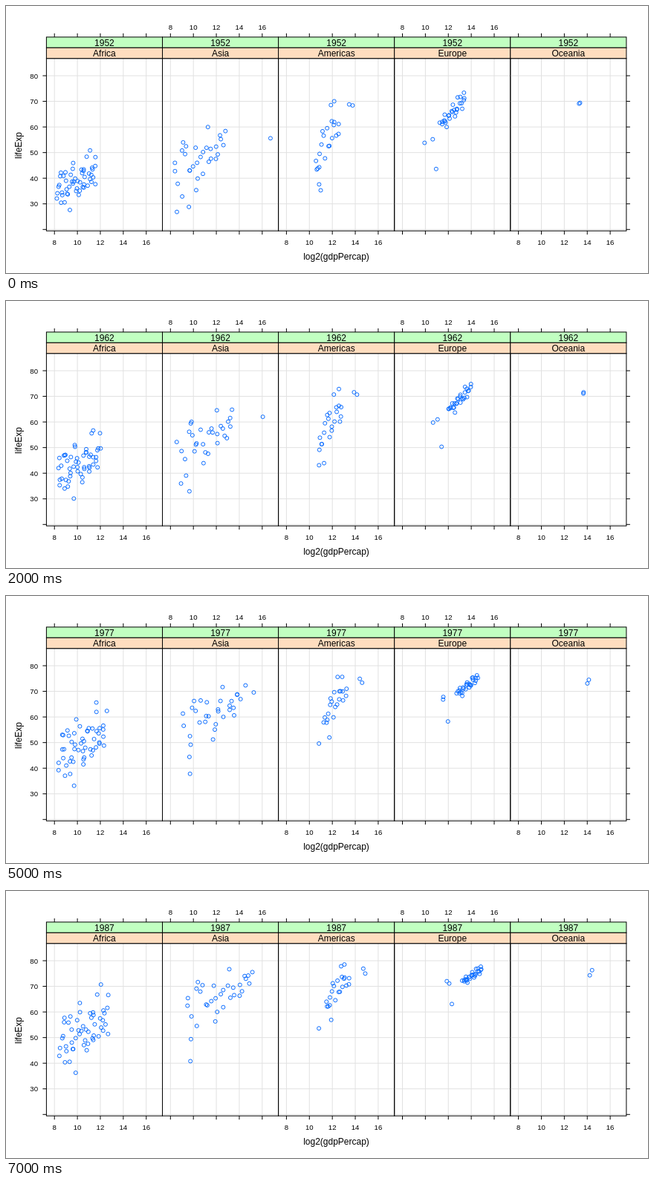
Recreate the animation shown at these times as an HTML page. Size 864 px wide and 360 px high, loop 8 s.

```html
<!DOCTYPE html>
<html lang="en">
<head>
<meta charset="utf-8">
<title>Life expectancy by income</title>
<style>
html, body { margin: 0; width: 100%; height: 100%; overflow: hidden; background: #fff; }
svg { display: block; width: 864px; height: 360px; }
text { font: 12px "Liberation Sans", Arial, sans-serif; text-anchor: middle; }
.small { font-size: 9.6px; }
.end { text-anchor: end; }
.line { stroke: #000; fill: none; }
.grid { stroke: #e1e1e1; fill: none; }
.dot { stroke: #0a6cff; fill: none; }
</style>
</head>
<body>
<svg id="chart" viewBox="0 0 864 360"></svg>
<script>
// Each cloud drifts from its first to its last [mean x, spread x, mean y, spread y];
// tilt is the correlation. Loners lie outside it and go from one [x, y] to another.
const panels = [
  { name: 'Africa', count: 52, tilt: .5,
    cloud: [[9.92, 1, 39.1, 5.1], [10.6, 1.25, 53.3, 7.5]], loners: [] },
  { name: 'Asia', count: 31, tilt: .72,
    cloud: [[10.5, 1.3, 46.6, 8.5], [12.2, 1.65, 65.7, 7]],
    loners: [[[16.72, 55.6], [14.78, 74.2]], [[9.61, 28.8], [9.74, 40.8]]] },
  { name: 'Americas', count: 22, tilt: .6,
    cloud: [[11.55, .6, 53, 8], [12.45, .6, 68, 5]],
    loners: [[[13.77, 68.4], [14.87, 75]], [[13.47, 68.8], [14.7, 76.9]],
      [[10.85, 37.6], [10.83, 53.6]]] },
  { name: 'Europe', count: 27, tilt: .9,
    cloud: [[12.4, .65, 65.8, 4.5], [14.1, .5, 74.2, 2.1]],
    loners: [[[10.94, 43.6], [12.31, 63.1]], [[9.93, 53.8], [12.08, 71.1]],
      [[10.64, 55.2], [11.87, 72]]] },
  { name: 'Oceania', count: 0, tilt: 0, cloud: [[], []],
    loners: [[[13.29, 69.1], [14.42, 76.3]], [[13.37, 69.4], [14.22, 74.3]]] }
];

const WIDTH = 156.1, LEFT = 54.4, TOP = 41.9, STRIP = 14.4, BOTTOM = 303.2;
const MID = TOP + STRIP, HEAD = MID + STRIP;
const STEPS = 8, STEP_MS = 1000, FIRST_YEAR = 1952;
const chart = document.getElementById('chart');
const xTicks = [8, 10, 12, 14, 16];
const yTicks = [20, 30, 40, 50, 60, 70, 80];
const px = v => 65.2 + (v - 8) * 15.44;
const py = v => 94 + (80 - v) * 3.455;
const mix = (from, to, p) => from.map((v, i) => v + (to[i] - v) * p);

let seed = 1952;
function random() {
  seed = (seed * 1664525 + 1013904223) % 4294967296;
  return seed / 4294967296;
}

function add(tag, attrs, text) {
  const el = document.createElementNS('http://www.w3.org/2000/svg', tag);
  for (const key in attrs) el.setAttribute(key, attrs[key]);
  if (text !== undefined) el.textContent = text;
  return chart.appendChild(el);
}
const path = (d, cls) => add('path', { d, class: cls });
const label = (x, y, text, cls = '') => add('text', { x, y, class: cls }, text);
const box = (x, y, bottom, fill) =>
  add('rect', { x, y, width: WIDTH, height: bottom - y, fill, stroke: '#000' });
const circle = () => add('circle', { r: 2.5, class: 'dot' });

// Even coverage along x and a triangular scatter along y, both with unit spread.
function cloudDot(panel, n) {
  const across = ((n + random()) / panel.count * 2 - 1) * Math.sqrt(3);
  const scatter = (random() + random() - 1) * Math.sqrt(6);
  const up = panel.tilt * across + Math.sqrt(1 - panel.tilt ** 2) * scatter;
  const phase = random() * 2 * Math.PI;
  return {
    el: circle(),
    at(p) {
      const [mx, sx, my, sy] = mix(...panel.cloud, p);
      const sway = phase + 6 * p;
      return [mx + sx * (across + .1 * Math.sin(sway)), my + sy * (up + .1 * Math.cos(sway))];
    }
  };
}

function buildPanel(panel, i) {
  const shift = i * WIDTH, x0 = LEFT + shift, mid = x0 + WIDTH / 2;
  for (const v of xTicks) path(`M${px(v) + shift} ${HEAD}V${BOTTOM}`, 'grid');
  for (const v of yTicks) path(`M${x0} ${py(v)}h${WIDTH}`, 'grid');
  panel.dots = panel.loners.map(track => ({ el: circle(), at: p => mix(...track, p) }));
  for (let n = 0; n < panel.count; n++) panel.dots.push(cloudDot(panel, n));
  box(x0, HEAD, BOTTOM, 'none');
  box(x0, TOP, MID, '#c1ffc1');
  box(x0, MID, HEAD, '#ffddbf');
  panel.year = label(mid, 54, '');
  label(mid, 68, panel.name);
  for (const v of xTicks) {
    const x = px(v) + shift;
    path(`M${x} ${TOP}v-5M${x} ${BOTTOM}v5`, 'line');
    label(x, i % 2 ? 31.5 : 322, v, 'small');
  }
}

panels.forEach(buildPanel);
for (const v of yTicks) {
  path(`M${LEFT} ${py(v)}h-5M${LEFT + 5 * WIDTH} ${py(v)}h5`, 'line');
  if (v > 20) label(43, py(v) + 3.7, v, 'small end');
}
label(444.5, 342, 'log2(gdpPercap)');
add('text', { transform: 'translate(20.5 188) rotate(-90)' }, 'lifeExp');

function show(step) {
  const p = (step / (STEPS - 1)) ** .85;
  panels.forEach((panel, i) => {
    panel.year.textContent = FIRST_YEAR + 5 * step;
    for (const { el, at } of panel.dots) {
      const [x, y] = at(p);
      el.setAttribute('cx', px(x) + i * WIDTH);
      el.setAttribute('cy', py(y));
    }
  });
}

let shown = -1;
function tick() {
  const step = Math.floor(performance.now() / STEP_MS) % STEPS;
  if (step !== shown) show(shown = step);
  requestAnimationFrame(tick);
}
tick();
</script>
</body>
</html>
```
